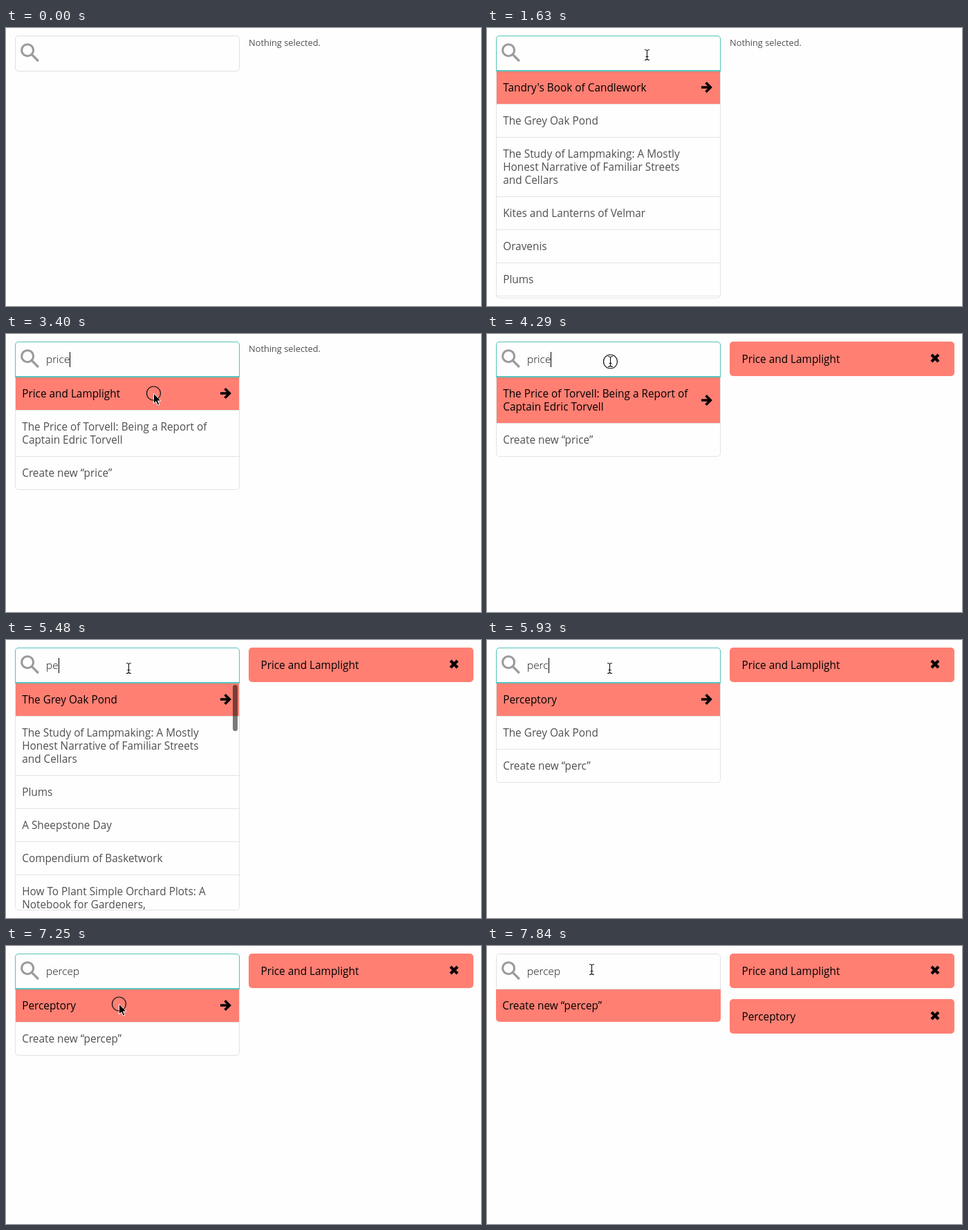
These frames come from a looping animation (687 by 403 pixels, 7990 ms). An HTML page:

```html
<!DOCTYPE html>
<html lang="en">
<head>
<meta charset="utf-8">
<title>Book picker</title>
<style>
  html, body { margin: 0; width: 100%; height: 100%; overflow: hidden; background: #fefefe; }
  body { position: relative; font: 15.36px/19.2px "Open Sans", sans-serif; color: #505050; }
  body > * { position: absolute; box-sizing: border-box; }
  svg { overflow: visible; fill: none; }

  #field { left: 13px; top: 11px; width: 325px; height: 52px; border: 1px solid #e0e0e0; border-radius: 5px; z-index: 2; }
  #field.open { border-radius: 5px 5px 0 0; }
  #field.focus { border-color: #55c3ba; border-bottom-width: 2px; }
  #glass { left: 0; top: 0; width: 60px; height: 63px; stroke: #9b9b9b; z-index: 3; }
  #entry { left: 58px; top: 26px; height: 22px; line-height: 22px; font-weight: 300; color: #111; white-space: pre; z-index: 3; }
  #query.marked { background: #b3d7fe; }
  #caret { display: inline-block; width: 1px; height: 22px; background: #000; vertical-align: top; }

  #list { left: 13px; top: 63px; width: 325px; max-height: 329px; overflow: hidden; border: solid #e3e3e3; border-width: 0 1px 1px; border-radius: 0 0 5px 5px; }
  #list.bare { border: 0; }
  .row { position: relative; padding: 13.9px 9.2px; white-space: pre; }
  .row + .row { border-top: 1px solid #e4e4e4; }
  .row:first-child { background: #ff7f73; color: #000; }
  .row svg { position: absolute; left: 296px; top: 50%; width: 16px; height: 16px; margin-top: -8px; stroke: #000; stroke-width: 3.6; }
  #bar { left: 328px; top: 65px; width: 7px; height: 67px; border-radius: 4px; background: rgba(0, 0, 0, .52); }

  #status { left: 351px; top: 11px; font-size: 12.8px; line-height: 20px; color: #505050; }
  .pick { left: 351px; width: 325px; height: 50px; padding-left: 17.4px; line-height: 52px; border-radius: 5px; background: #ff7f73; color: #000; }
  .pick svg { position: absolute; left: 290px; top: 17px; width: 14px; height: 14px; stroke: #000; stroke-width: 4.2; }
  #pick1 { top: 11px; }
  #pick2 { top: 77px; }
  #pointer { left: 0; top: 0; width: 1px; height: 1px; z-index: 5; }
</style>
</head>
<body>
<div id="status">Nothing selected.</div>
<div class="pick" id="pick1">Price and Lamplight<svg><path d="M2 2L12 12M12 2L2 12"/></svg></div>
<div class="pick" id="pick2">Perceptory<svg><path d="M2 2L12 12M12 2L2 12"/></svg></div>
<div id="list"></div>
<div id="bar"></div>
<div id="field"></div>
<svg id="glass"><circle cx="31.1" cy="32.2" r="8.5" stroke-width="3.1"/><path d="M36.5 37.7L46.8 48" stroke-width="3.3"/></svg>
<div id="entry"><span id="query"></span><span id="caret"></span></div>
<svg id="pointer">
  <defs><path id="bar-i" d="M-3.5 -7.5Q-.5 -7.5 0 -6Q.5 -7.5 3.5 -7.5M0 -6V6M-3.5 7.5Q-.5 7.5 0 6Q.5 7.5 3.5 7.5M-2 2.5H2"/></defs>
  <g id="beam">
    <use href="#bar-i" stroke="#fff" stroke-width="2.4"/>
    <use href="#bar-i" stroke="#111" stroke-width="1.1"/>
  </g>
  <path id="arrow" d="M0 0V15L3.5 11.8L6 17.2L8.4 16.1L6 10.9H10.6Z" fill="#000" stroke="#fff"/>
  <circle id="ring" r="10" stroke="#111" stroke-width="1.2"/>
</svg>
<script>
const LOOP = 7990;
const $ = id => document.getElementById(id);

const pond = "The Grey Oak Pond";
const lamps = "The Study of Lampmaking: A Mostly\nHonest Narrative of Familiar Streets\nand Cellars";
const plums = "Plums", day = "A Sheepstone Day";
const price = "Price and Lamplight";
const captain = "The Price of Torvell: Being a Report of\nCaptain Edric Torvell";
const perceptory = "Perceptory";

const all = ["Tandry's Book of Candlework", pond, lamps, "Kites and Lanterns of Velmar", "Oravenis", plums, day];
const withP = [pond, lamps, plums, day, "Compendium of Basketwork",
  "How To Plant Simple Orchard Plots: A\nNotebook for Gardeners,", price];
const prices = [price, captain];

// "+" at the end of a list stands for the create row
const steps = [
  { t: 0, text: "", list: [], focus: 0, caret: 0, marked: 0, bar: 0, picks: 0, shape: "", at: [0, 0], ring: 0, bare: 0 },
  { t: 140, shape: "arrow", at: [667, 385] },
  { t: 290, at: [556, 317] },
  { t: 580, at: [452, 222] },
  { t: 730, at: [320, 110] },
  { t: 880, shape: "beam", at: [231, 39], ring: 1 },
  { t: 1030, ring: 0, focus: 1, caret: 1, list: all, bar: 1 },
  { t: 1480, caret: 0, bar: .45 },
  { t: 1630, bar: 0 },
  { t: 2080, text: "p", caret: 1, list: withP, bar: 1 },
  { t: 2230, text: "pr", list: [...prices, "+"], bar: 0 },
  { t: 2370, text: "pri" },
  { t: 2520, text: "pric" },
  { t: 2670, text: "price" },
  { t: 2970, at: [226, 56] },
  { t: 3120, shape: "arrow", at: [217, 78] },
  { t: 3270, at: [213, 86], ring: 1 },
  { t: 3410, ring: 0, focus: 0, caret: 0, picks: 1, list: [captain, "+"] },
  { t: 3560, at: [204, 74] },
  { t: 3710, shape: "beam", at: [190, 53] },
  { t: 3850, at: [181, 42] },
  { t: 4000, at: [178, 40] },
  { t: 4290, ring: 1, focus: 1, caret: 1 },
  { t: 4440, ring: 0, at: [177, 41] },
  { t: 4590, marked: 1, caret: 0 },
  { t: 5040, text: "", marked: 0, caret: 1, list: all, bar: 1 },
  { t: 5340, text: "p", list: withP },
  { t: 5480, text: "pe" },
  { t: 5630, text: "per" },
  { t: 5780, list: [perceptory, pond, "+"], bar: 0 },
  { t: 5930, text: "perc" },
  { t: 6070, list: [perceptory, "+"] },
  { t: 6220, text: "perce" },
  { t: 6370, text: "percep" },
  { t: 6520, caret: 0 },
  { t: 6810, at: [173, 52] },
  { t: 6960, shape: "arrow", at: [167, 72] },
  { t: 7110, at: [163, 84] },
  { t: 7250, ring: 1 },
  { t: 7400, ring: 0, focus: 0, picks: 2, list: ["+"], bare: 1 },
  { t: 7550, at: [158, 68] },
  { t: 7700, shape: "beam", at: [153, 42] },
  { t: 7840, at: [151, 34] }
];

// each state carries over what the step leaves unchanged
const states = [];
steps.forEach((step, i) => states.push({ ...states[i - 1], ...step }));

const show = (id, on) => { $(id).style.display = on ? "" : "none"; };

function makeRow(item, i, text) {
  const row = document.createElement("div");
  const create = item === "+";
  row.className = "row";
  row.textContent = create ? `Create new “${text}”` : item;
  if (i === 0 && !create)
    row.insertAdjacentHTML("beforeend", '<svg><path d="M0 8H13.5M6.6 1.3L13.3 8L6.6 14.7"/></svg>');
  return row;
}

function render(s) {
  $("query").textContent = s.text;
  $("query").className = s.marked ? "marked" : "";
  show("caret", s.caret);
  $("field").className = (s.focus ? "focus " : "") + (s.list.length ? "open" : "");
  $("list").replaceChildren(...s.list.map((item, i) => makeRow(item, i, s.text)));
  $("list").className = s.bare ? "bare" : "";
  show("list", s.list.length);
  $("bar").style.opacity = s.bar;
  show("status", !s.picks);
  show("pick1", s.picks > 0);
  show("pick2", s.picks > 1);
  show("beam", s.shape === "beam");
  show("arrow", s.shape === "arrow");
  show("ring", s.ring);
  $("pointer").style.transform = `translate(${s.at[0] + .5}px, ${s.at[1]}px)`;
}

let start, last;
function tick(now) {
  start ??= now;
  const t = (now - start) % LOOP;
  const state = states.findLast(s => s.t <= t) || states[0];
  if (state !== last) render(last = state);
  requestAnimationFrame(tick);
}
render(last = states[0]);
requestAnimationFrame(tick);
</script>
</body>
</html>
```
